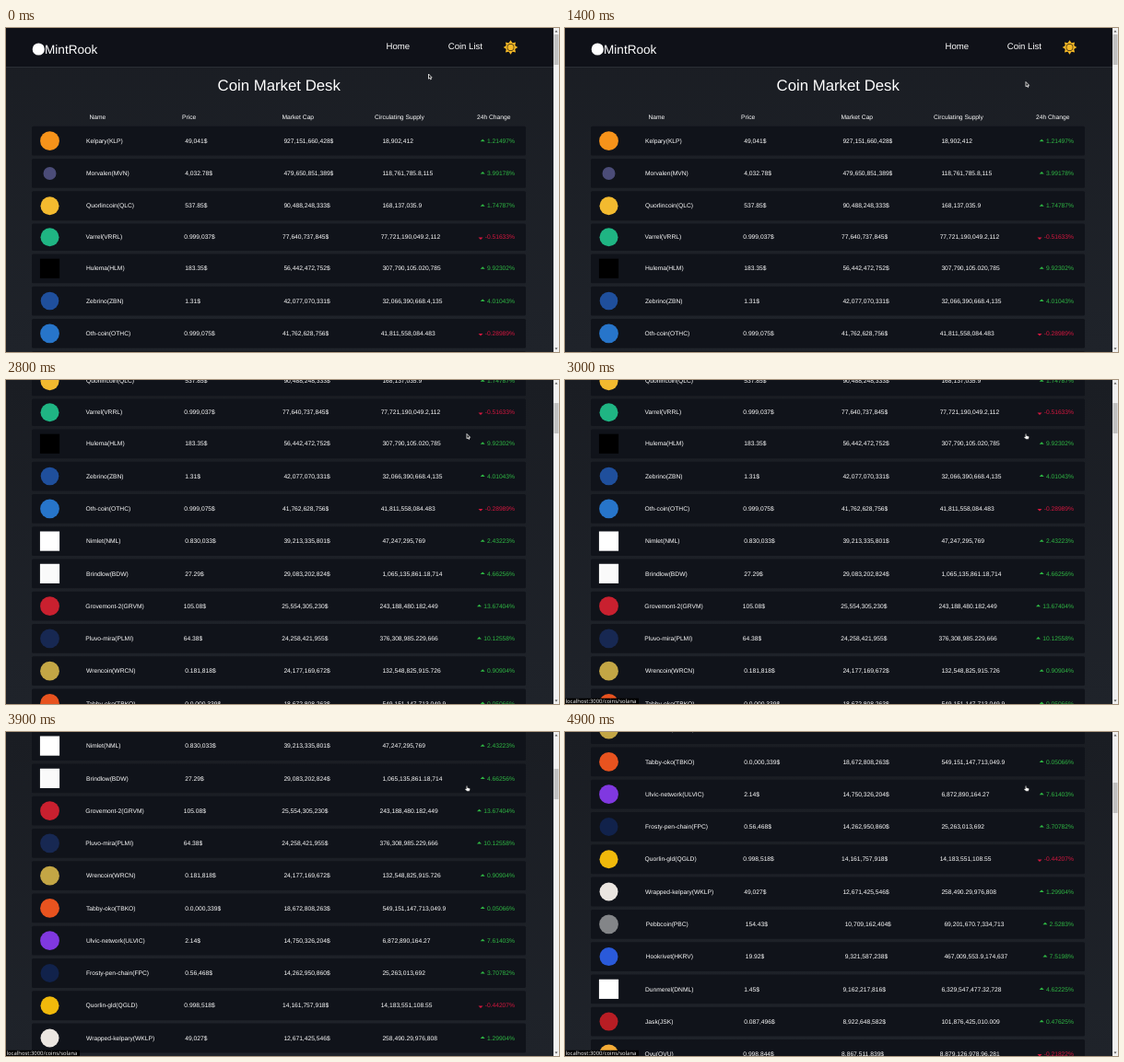
Animation of 600x352 px, one loop 5 s. Source, as an HTML page with a canvas:

```html
<!DOCTYPE html>
<html lang="en">
<head>
<meta charset="utf-8">
<title>Coin Market Desk</title>
<style>
html, body { margin: 0; width: 100%; height: 100%; overflow: hidden; background: #1b1e24; }
canvas { display: block; }
</style>
</head>
<body>
<canvas id="stage" width="600" height="352"></canvas>
<script>
const W = 600, H = 352, LOOP = 5000, STEP = 100;
const ctx = document.getElementById('stage').getContext('2d');
const SANS = '"Liberation Sans", Arial, sans-serif';
const UI = '"Noto Sans", sans-serif';
const SMALL = 6.7, DIGIT = 3.73, BAR = 594;

// name | price | market cap | supply | change | icon colour | icon radius | square?
const coins = `
Kelpary(KLP)|49,041$|927,151,660,428$|18,902,412|1.21497%|#f7931a|10.4
Morvalen(MVN)|4,032.78$|479,650,851,389$|118,761,785.8,115|3.99178%|#4b4c78|7
Quorlincoin(QLC)|537.85$|90,488,248,333$|168,137,035.9|1.74787%|#f3ba2f|10
Varrel(VRRL)|0.999,037$|77,640,737,845$|77,721,190,049.2,112|-0.51633%|#1fb583|10
Hulema(HLM)|183.35$|56,442,472,752$|307,790,105.020,785|9.92302%|#000|10.6|s
Zebrino(ZBN)|1.31$|42,077,070,331$|32,066,390,668.4,135|4.01043%|#1f4f9c|9.8
Oth-coin(OTHC)|0.999,075$|41,762,628,756$|41,811,558,084.483|-0.28989%|#2775ca|10.4
Nimlet(NML)|0.830,033$|39,213,335,801$|47,247,295,769|2.43223%|#fff|10.6|s
Brindlow(BDW)|27.29$|29,083,202,824$|1,065,135,861.18,714|4.66256%|#fafafa|10.6|s
Grovemont-2(GRVM)|105.08$|25,554,305,230$|243,188,480.182,449|13.67404%|#c9202f|10.4
Pluvo-mira(PLMI)|64.38$|24,258,421,955$|376,308,985.229,666|10.12558%|#172852|10.4
Wrencoin(WRCN)|0.181,818$|24,177,169,672$|132,548,825,915.726|0.90904%|#c3a645|10.4
Tabby-oko(TBKO)|0.0,000,339$|18,672,808,263$|549,151,147,713,049.9|0.05066%|#e8531f|10.4
Ulvic-network(ULVIC)|2.14$|14,750,326,204$|6,872,890,164.27|7.61403%|#8038e0|10.4
Frosty-pen-chain(FPC)|0.56,468$|14,262,950,860$|25,263,013,692|3.70782%|#11224b|10
Quorlin-gld(QGLD)|0.998,518$|14,161,757,918$|14,183,551,108.55|-0.44207%|#f0b90b|10
Wrapped-kelpary(WKLP)|49,027$|12,671,425,546$|258,490.29,976,808|1.29904%|#ebe6e1|10
Pebbcoin(PBC)|154.43$|10,709,162,404$|69,201,670.7,334,713|2.5283%|#838588|10.4
Hookrivet(HKRV)|19.92$|9,321,587,238$|467,009,553.9,174,637|7.5198%|#2a5ada|10
Dunmerel(DNML)|1.45$|9,162,217,816$|6,329,547,477.32,728|4.62225%|#fff|10.6|s
Jask(JSK)|0.087,496$|8,922,648,582$|101,876,425,010.009|0.47625%|#b81d24|10
Ovu(OVU)|0.998,844$|8,867,511,839$|8,879,126,978.96,281|-0.21822%|#f5ac37|10.4
`.trim().split('\n').map(line => line.split('|'));

function text(str, x, y, size = SMALL, color = '#fff', align = 'left', family = SANS) {
  ctx.font = `${size}px ${family}`;
  ctx.fillStyle = color;
  ctx.textAlign = align;
  ctx.fillText(str, x, y);
}

function rect(x, y, w, h, color, r = 0) {
  ctx.fillStyle = color;
  ctx.beginPath();
  ctx.roundRect(x, y, w, h, r);
  ctx.fill();
}

function disc(x, y, r, color) {
  ctx.fillStyle = color;
  ctx.beginPath();
  ctx.arc(x, y, r, 0, 7);
  ctx.fill();
}

function triangle(x, y, halfWidth, height, color) {
  ctx.fillStyle = color;
  ctx.beginPath();
  ctx.moveTo(x - halfWidth, y + height / 2);
  ctx.lineTo(x + halfWidth, y + height / 2);
  ctx.lineTo(x, y - height / 2);
  ctx.fill();
}

function sun(x, y) {
  const gold = '#f6b927';
  ctx.save();
  ctx.translate(x, y);
  for (let i = 0; i < 8; i++) {
    triangle(0, -6, 2.3, 3.6, gold);
    ctx.rotate(Math.PI / 4);
  }
  ctx.restore();
  disc(x, y, 5, gold);
  disc(x, y, 3.9, '#3a2c12');
  disc(x, y, 3.2, gold);
}

function header() {
  rect(0, 0, BAR, 42, '#0f1118');
  rect(0, 42, BAR, 1, '#2b2e35');
  disc(35.3, 23, 6.6, '#fff');
  text('MintRook', 42, 28, 13.6);
  text('Home', 412.5, 23.3, 9.6);
  text('Coin List', 479.7, 23.3, 9.6);
  sun(547.5, 21);
  text('Coin Market Desk', 296.2, 68.2, 16.8, '#fff', 'center');
  const heads = { 'Name': 90.5, 'Price': 191, 'Market Cap': 299.5, 'Circulating Supply': 400, '24h Change': 511 };
  for (const label in heads) text(label, heads[label], 99.2);
}

function row([name, price, cap, supply, change, color, radius, square], top, height) {
  const mid = top + height / 2, base = mid + 2.2, r = +radius;
  const down = change[0] === '-';
  // Spare width from the last cell is shared between the columns.
  const slack = down ? -2.2 : (8 - change.length) * DIGIT;
  rect(28, top, 536, height, '#10131a', 1.5);
  if (square) rect(47.5 - r, mid - r, 2 * r, 2 * r, color);
  else disc(47.5, mid, r, color);
  [name, price, cap, supply].forEach((cell, i) =>
    text(cell, [87, 194.2, 301.4, 408.4][i] + slack * (i + 1) / 5, base));
  const tone = down ? '#d4173f' : '#2fb944';
  text(change, 552, base, SMALL, tone, 'right');
  const left = 552 - 30.2 + slack;
  triangle(left - 4.6, mid + (down ? 1.5 : -0.7), 2.5, down ? -2.5 : 2.5, tone);
}

function table() {
  let top = 106.8;
  coins.forEach((coin, i) => {
    const height = i === 3 ? 29.3 : 31.8;
    row(coin, top, height);
    top += height + 3.47;
  });
}

function scrollbar(scroll) {
  const mid = (BAR + W) / 2;
  rect(BAR, 0, W - BAR, H, '#f1f1f1');
  rect(BAR + 0.5, 7 + scroll * 0.094, W - BAR - 1, 33, '#c1c1c1');
  triangle(mid, 3.5, 1.5, 1.8, '#505050');
  triangle(mid, 348.5, 1.5, -1.8, '#505050');
}

const arrow = new Path2D('M0 0V5.2L1.2 4.1L2.1 5.9L2.9 5.5L2.1 3.8H3.6Z');
const hand = new Path2D('M1.2 0.6Q1.9 -0.2 2.4 0.6V2.4L4.8 3Q5.5 3.3 5.3 4.1L4.7 6H1.9L-0.3 4Q0 3.1 1.2 3.7Z');

function pointer(x, y, over) {
  ctx.save();
  ctx.translate(x, y);
  ctx.lineJoin = 'round';
  ctx.lineWidth = over ? 0.4 : 0.8;
  ctx.strokeStyle = over ? '#222' : '#fff';
  ctx.fillStyle = over ? '#fff' : '#0a0a0a';
  ctx.fill(over ? hand : arrow);
  ctx.stroke(over ? hand : arrow);
  ctx.restore();
}

const clamp = v => Math.min(1, Math.max(0, v));
const easeOut = u => 1 - (1 - u) ** 3;

// Each wheel burst: start, duration, distance.
const bursts = [[1900, 860, 192], [3000, 486, 160], [3978, 700, 159]];
const scrollAt = t => bursts.reduce((sum, [start, time, dist]) =>
  sum + dist * easeOut(clamp((t - start) / time)), 0);

function draw(t) {
  const scroll = scrollAt(t), over = t >= 3000;
  const back = ctx.createLinearGradient(0, 0, 0, H);
  back.addColorStop(0, '#1a1d23');
  back.addColorStop(1, '#1f232a');
  ctx.fillStyle = back;
  ctx.fillRect(0, 0, W, H);
  ctx.textRendering = 'geometricPrecision';

  ctx.save();
  ctx.translate(0, -scroll);
  header();
  table();
  ctx.restore();

  scrollbar(scroll);
  if (over) {
    rect(0, 345.8, 80, 6.2, '#000');
    text('localhost:3000/coins/solana', 0.5, 351.4, 5.9, '#f0f0f0', 'left', UI);
  }
  const move = clamp(t / 1300);
  if (over) pointer(498.2, 58.2, true);
  else pointer(458.5 + 41.5 * move, 50 + 8.5 * move, false);
}

const began = performance.now();
function tick() {
  const t = (performance.now() - began) % LOOP;
  draw(Math.floor(t / STEP) * STEP);
  requestAnimationFrame(tick);
}
tick();
</script>
</body>
</html>
```
